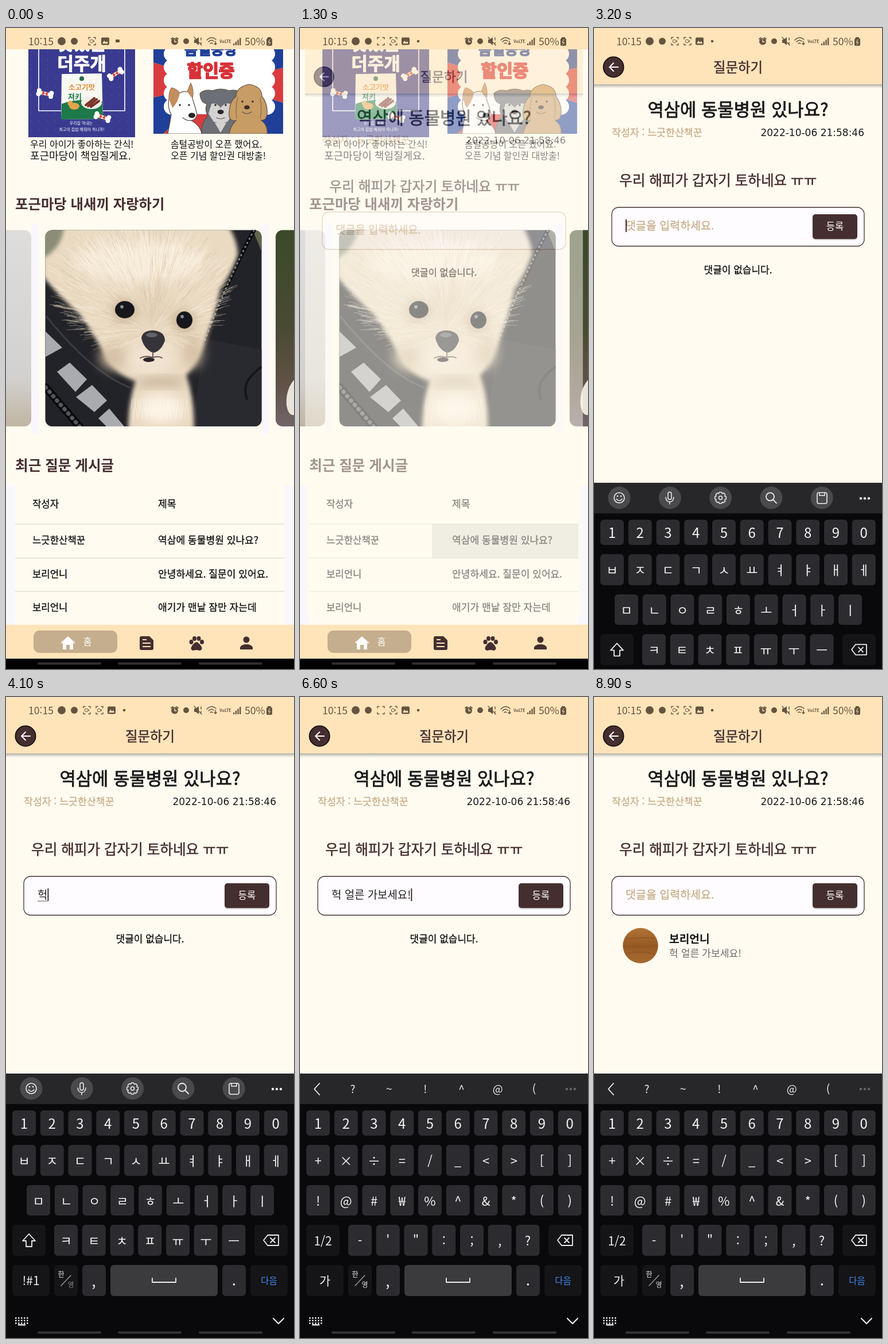
Recreate the animation shown at these times as an HTML page. Size 502x1115 px, loop 9 s.

```html
<!DOCTYPE html>
<html lang="ko">
<head>
<meta charset="utf-8">
<title>반려동물 질문 게시판</title>
<style>
html, body { margin: 0; width: 100%; height: 100%; overflow: hidden; background: #fffbf0; }
svg { display: block; width: 502px; height: 1115px; }
text { font-family: "Noto Sans CJK KR", "Noto Sans", sans-serif; white-space: pre; }
</style>
</head>
<body>
<svg viewBox="0 0 502 1115">
  <defs>
    <linearGradient id="wall" x2="0" y2="1"><stop stop-color="#dedddc"/><stop offset=".75" stop-color="#d3d1cf"/><stop offset="1" stop-color="#c0b5a3"/></linearGradient>
    <linearGradient id="heath" x2="0" y2="1"><stop stop-color="#3b4a2a"/><stop offset=".5" stop-color="#4a4a33"/><stop offset=".8" stop-color="#625348"/><stop offset="1" stop-color="#72636a"/></linearGradient>
    <linearGradient id="wood" x2="0" y2="1"><stop stop-color="#b07434"/><stop offset=".5" stop-color="#955a25"/><stop offset="1" stop-color="#a76a30"/></linearGradient>
    <linearGradient id="shade" x2="0" y2="1"><stop stop-color="#000" stop-opacity=".3"/><stop offset="1" stop-color="#000" stop-opacity="0"/></linearGradient>
    <filter id="soft"><feGaussianBlur stdDeviation="3.5"/></filter>
    <filter id="blur" x="-1" y="-1" width="3" height="3"><feGaussianBlur stdDeviation="10"/></filter>
    <clipPath id="photo"><rect x="68.5" y="351.5" width="377" height="341.5" rx="12"/></clipPath>
    <clipPath id="bannerA"><rect x="39" y="37" width="186" height="153"/></clipPath>
    <clipPath id="bannerB"><rect x="257" y="37" width="226" height="147"/></clipPath>
    <clipPath id="cell"><rect x="230" y="863" width="255" height="59"/></clipPath>
  </defs>
  <g id="home"></g>
  <g id="ripple" clip-path="url(#cell)"></g>
  <g id="page"></g>
  <g id="nav"></g>
  <g id="board"></g>
  <g id="status"></g>
</svg>
<script>
const $ = id => document.getElementById(id);
const BROWN = '#452e2f', TAN = '#c8ad89', PEACH = '#ffe4ba', CREAM = '#fffbf0', ICON = '#65543f';
const SHOP = '포근마당', SALON = '솜털공방', ASKER = '느긋한산책꾼', REPLIER = '보리언니';
const QUESTION = '역삼에 동물병원 있나요?';

// Shape helpers; text is placed by its vertical centre.
const esc = s => s.replace(/&/g, '&amp;').replace(/</g, '&lt;');
const T = (s, x, y, size, fill = '#111', anchor = 'start', weight = 400, more = '') =>
  `<text x="${x}" y="${y + size * .37}" font-size="${size}" fill="${fill}" text-anchor="${anchor}" font-weight="${weight}" ${more}>${esc(s)}</text>`;
const M = (s, x, y, size, fill, weight, more) => T(s, x, y, size, fill, 'middle', weight, more);
const thick = (color, w = .5) => `stroke="${color}" stroke-width="${w}" stroke-linejoin="round"`;
const R = (x, y, w, h, fill, r = 0, more = '') =>
  `<rect x="${x}" y="${y}" width="${w}" height="${h}" rx="${r}" fill="${fill}" ${more}/>`;
const E = (x, y, rx, ry, fill, more = '') =>
  `<ellipse cx="${x}" cy="${y}" rx="${rx}" ry="${ry}" fill="${fill}" ${more}/>`;
const C = (x, y, r, fill, more) => E(x, y, r, r, fill, more);
const F = (d, fill, more = '') => `<path d="${d}" fill="${fill}" ${more}/>`;
const L = (d, stroke, w = 1.5, more = '') =>
  `<path d="${d}" fill="none" stroke="${stroke}" stroke-width="${w}" stroke-linecap="round" stroke-linejoin="round" ${more}/>`;
const list = (n, f) => Array.from({length: n}, (_, i) => f(i)).join('');
const clamp = v => Math.max(0, Math.min(1, v));
const ease = v => 1 - (1 - clamp(v)) ** 3;
let seed = 7;
const rand = () => (seed = seed * 16807 % 2147483647) / 2147483647;

function snackBanner() {
  const bone = (x, y, a) => `<g transform="translate(${x} ${y}) rotate(${a})">` +
    L('M-9 0H9', '#fff', 6) + [-11, 11].map(v => C(v, -3, 4, '#fff') + C(v, 3, 4, '#fff')).join('') +
    F('M-5 -5L5 5V-5L-5 5z', '#d9503f') + '</g>';
  const dots = list(140, i => C(44 + i % 14 * 14, 42 + Math.floor(i / 14) * 15, 1, '#4c4ea4'));
  return '<g clip-path="url(#bannerA)">' + R(39, 37, 186, 153, '#3a3b90') + dots +
    L('M57 30V144H207V30', '#fff', 1.6) + R(84, 30, 94, 48, '#3a3b90') +
    M('맛있는', 132, 27, 31, '#fff', 700, thick('#fff', 1)) + M('더주개', 132, 62, 31, '#fff', 700, thick('#fff', 1)) +
    F('M97 80L167 79L169 158L96 159z', '#f8f8f3') +
    F('M97 132Q124 121 168 128L169 158L96 159z', '#1d7949') + C(132, 88, 4, '#246b47') +
    M('소고기맛', 132, 103, 12.5, '#e28a2c', 700) + T('져키', 108, 119, 13, '#1d7949', 'start', 700) +
    E(119, 136, 9, 6, '#e3a34b') + C(112, 131, 4.5, '#e3a34b') +
    E(149, 130, 18, 11, '#f3eee5') + L('M139 134L154 122M143 136L158 124M148 137L162 127', '#793128', 4) +
    bone(191, 80, -32) + bone(68, 114, 12) + bone(168, 155, 18) +
    M('우리집 막내는', 131, 165, 7, '#fff') + M('최고의 집밥 해줘야 하니까!', 132, 176, 7, '#fff') + '</g>';
}

function salonBanner() {
  const ray = i => {
    const p = a => `${370 + 200 * Math.cos(a)} ${95 + 200 * Math.sin(a)}`, a = i * Math.PI / 6 + .3;
    return F(`M370 95L${p(a)}L${p(a + Math.PI / 6)}z`, i % 2 ? '#d83b40' : '#203f98');
  };
  const ink = 'stroke="#5e5148" stroke-width="1.2"';
  const eyes = (x, y, gap) => C(x - gap, y, 1.7, '#2c2727') + C(x + gap, y, 1.7, '#2c2727');
  return '<g clip-path="url(#bannerB)">' + list(12, ray) + R(286, 20, 172, 130, '#fff', 20) +
    list(10, i => C(i % 2 ? 455 : 289, 45 + Math.floor(i / 2) * 23, 14, '#fff')) +
    M(SALON, 357, 37, 25, '#203f98', 900, thick('#203f98', 1.5)) + M('할인중', 357, 74, 30, '#d8323a', 900, thick('#d8323a', 2)) +
    // Terrier
    F('M282 184Q286 164 288 151Q281 138 284 123Q284 108 289 104Q297 106 303 113Q309 109 316 111L322 96Q328 108 325 123Q330 137 333 150Q331 160 323 161Q339 170 341 184z', '#fff', ink) +
    F('M284 123Q284 108 289 104Q297 106 303 113Q300 130 290 139zM316 111L322 96Q328 108 325 123z', '#c58d5e') +
    eyes(311, 134, 8) + E(324, 152, 6, 4.5, '#2c2727') + L('M308 156Q316 163 326 160', '#5e5148', 1.2) +
    // Schnauzer
    F('M341 184Q340 164 352 153Q346 143 350 132Q339 130 338 114Q346 106 360 109Q374 103 389 109Q402 106 408 113Q410 128 398 133Q402 146 396 153Q409 165 405 184z', '#6d6f76', ink) +
    F('M358 132Q367 129 374 139Q381 129 391 132L396 149L386 163Q374 168 362 163L353 149z', '#d4d2d1') +
    F('M364 165H384L374 182z', '#d4d2d1') + eyes(374, 134, 9) + E(374, 146, 5.5, 4, '#2c2727') + L('M367 156Q374 160 381 156', '#5e5148', 1.2) +
    // Poodle
    F('M389 184Q391 170 401 161Q387 163 389 145Q390 127 401 119Q401 103 423 98Q446 101 446 119Q456 130 455 149Q454 162 444 160Q457 169 455 184z', '#c79c65', ink) +
    L('M404 121Q399 142 402 157M443 121Q447 142 443 157', '#8f6c48', 1.2) +
    eyes(421, 128, 9) + E(420, 138, 5, 3.5, '#3a2b25') + L('M412 146Q420 152 428 146', '#5e5148', 1.2) + '</g>';
}

function dogPhoto() {
  const hair = color => L(list(450, () => {
    const a = rand() * 6.283, u = Math.sqrt(rand());
    const x = 236 + 144 * u * Math.cos(a), y = 454 + 104 * u * Math.sin(a);
    const dx = x - 255, dy = y - 525, k = (8 + rand() * 24) / (Math.hypot(dx, dy) + 1);
    return `M${x.toFixed()} ${y.toFixed()}q${(dx * k / 2).toFixed(1)} ${(dy * k / 2 - 2).toFixed(1)} ${(dx * k).toFixed(1)} ${(dy * k).toFixed(1)}`;
  }), color, 1, 'opacity=".4"');
  const glow = (x, y, rx, ry, fill) => E(x, y, rx, ry, fill, 'filter="url(#blur)"');
  return '<g clip-path="url(#photo)">' + R(68, 351, 378, 343, '#222328') +
    F('M68 351H125L68 410z', '#8b8d76') + F('M430 351H446V390z', '#62664f') +
    F('M345 540L446 560V694H325z', '#292a30') + L('M69 500Q150 600 215 625', '#3b3c43', 3) +
    L('M445 590Q408 615 420 645', '#15161a', 4) +
    L('M432 352Q390 430 346 545', '#090a0d', 7) + L('M432 352Q390 430 346 545', '#777980', 3, 'stroke-dasharray="1 7"') +
    L('M69 625L128 693', '#0b0b0e', 14) + L('M69 625L128 693', '#55575e', 7, 'stroke-dasharray="1 9"') +
    F('M69 528L98 556L69 572zM89 598L111 582L141 611L121 633zM122 642L150 621L176 648L154 668zM161 679L180 662L206 693H175z', '#a9abaf') +
    F('M64 400Q84 392 96 368L104 340H385Q404 370 404 394Q392 430 374 452Q364 500 351 535Q336 584 314 604Q330 650 327 700H213Q213 650 226 614Q188 602 174 572Q152 530 128 498Q96 470 64 432z', '#eadac2', 'filter="url(#soft)"') +
    glow(235, 405, 115, 38, '#f7ecdb') + glow(190, 572, 26, 22, '#d5c1a5') + glow(325, 562, 16, 30, '#d5c1a5') +
    glow(258, 480, 25, 35, '#e2cfb5') + hair('#d3bc9b') + hair('#fffaf0') + hair('#f1e0c7') +
    glow(207, 492, 20, 18, '#bda587') + glow(309, 510, 18, 17, '#bda587') + glow(252, 575, 42, 28, '#f0e3d1') +
    glow(270, 616, 46, 5, '#ad977b') + glow(270, 662, 38, 24, '#fbf3e6') +
    L(list(40, i => `M${220 + i * 2.5} ${645 + i * 17 % 34}l${i % 5 - 2} 18`), '#fffaf0', 1, 'opacity=".6"') +
    E(207, 490, 17, 15, '#17171b') + E(311, 508, 14, 15, '#17171b') + C(202, 485, 3, '#858990') + C(307, 502, 3, '#858990') +
    F('M236 539Q238 526 257 526Q277 528 277 544Q270 563 256 565Q240 558 236 539z', '#35343a') + E(254, 534, 10, 4, '#65646b') +
    L('M256 564V571M234 574Q243 569 256 573Q267 570 272 574', '#6b5a50', 2) + E(249, 577, 10, 4, '#2b2527') + '</g>';
}

function homeScene() {
  const rows = [['작성자', '제목'], [ASKER, QUESTION], [REPLIER, '안녕하세요. 질문이 있어요.'], [REPLIER, '애기가 맨날 잠만 자는데']];
  const ink = thick('#111', .3);
  return R(0, 0, 502, 1115, CREAM) + snackBanner() + salonBanner() +
    T('우리 아이가 좋아하는 간식!', 42, 202, 16) + T(SHOP + '이 책임질게요.', 42, 222, 18) +
    T(SALON + '이 오픈 했어요.', 287, 202, 15.9) + T('오픈 기념 할인권 대방출!', 287, 222, 16) +
    T(SHOP + ' 내새끼 자랑하기', 16, 306, 24.4, BROWN, 'start', 700) +
    R(44, 340, 13, 366, '#f9f7fb') + R(446, 340, 13, 366, '#f9f7fb') +
    R(-30, 351.5, 74, 341.5, 'url(#wall)', 12) + R(470, 351.5, 60, 341.5, 'url(#heath)', 12) +
    F('M502 612Q487 630 489 656Q492 675 502 673z', '#e9e3da') + dogPhoto() +
    T('최근 질문 게시글', 16, 761, 24.6, BROWN, 'start', 700) +
    R(0, 796, 16, 242, '#f9f7fc') + R(485, 796, 17, 242, '#f9f7fc') +
    [863, 922, 980].map(y => R(16, y - .6, 469, 1.2, '#dcd7cd')).join('') +
    rows.map(([a, b], i) => {
      const y = [828, 891, 950, 1008][i];
      return T(a, 46, y, 16.7, '#111', 'start', 400, ink) + T(b, 265, y, 17.1, '#111', 'start', 400, ink);
    }).join('');
}

function pageScene() {
  const dark = '#1b1a1b';
  return R(0, 37, 502, 1001, CREAM) + R(0, 98, 502, 7, 'url(#shade)') + R(0, 0, 502, 98, PEACH) +
    C(34, 68, 17.7, BROWN, 'stroke="#0c0808" stroke-width="1.6"') + L('M42 68H27M34 61L27 68L34 75', '#fff', 2) +
    M('질문하기', 251, 68, 23.4, BROWN, 500, thick(BROWN)) + M(QUESTION, 251, 142, 30.8, dark, 500, thick(dark, .8)) +
    T('작성자 : ' + ASKER, 31, 182, 17.3, TAN, 'start', 400, thick(TAN, .3)) +
    T('2022-10-06 21:58:46', 471, 182, 17, dark, 'end', 400, 'style="font-family:\'DejaVu Sans\',sans-serif"') +
    T('우리 해피가 갑자기 토하네요 ㅠㅠ', 44, 265, 24.6, BROWN, 'start', 500, thick(BROWN)) +
    R(31, 312, 440, 67.5, '#fffcff', 12, 'id="field" stroke-width="1.3"') +
    '<g id="send">' + R(381, 326, 78, 43, '#0003', 5) + R(381, 324, 78, 43, BROWN, 5) + M('등록', 420, 345, 16.5, '#fff', 500) + '</g>' +
    T('댓글을 입력하세요.', 55, 344, 19.5, TAN, 'start', 400, 'id="hint" ' + thick(TAN, .3)) + T('', 55, 344, 18.9, '#222', 'start', 400, 'id="typed"') +
    R(55, 354.5, 0, 1.2, '#777', 0, 'id="underline"') + R(55, 333, 2, 22, BROWN, 0, 'id="caret"') +
    '<g id="empty">' + M('댓글이 없습니다.', 251, 421, 17, '#111', 400, thick('#111', .3)) + '</g>' +
    '<g id="comment">' + C(81, 432.5, 30.7, 'url(#wood)') +
    L('M55 421Q80 417 106 420M51 433Q80 438 110 432M55 446Q80 441 106 447', '#8a5122', 1.2) +
    T(REPLIER, 131, 421, 19.2, '#161415', 'start', 700) + T('헉 얼른 가보세요!', 131, 446, 17.2, '#706c69') + '</g>';
}

const pills = color => [55, 195, 336].map(x => R(x, 1103.5, 111, 4, color, 2)).join('');

function navScene() {
  return R(0, 1038, 502, 59, PEACH) + R(48, 1048, 146, 39, '#c5ae8e', 10) +
    F('M108 1058L121 1070H117V1081H111V1073H105V1081H99V1070H95z', '#fff') + M('홈', 142, 1067, 16, '#fff') +
    F('M236 1058H250L257 1065V1079Q257 1082 254 1082H236Q233 1082 233 1079V1061Q233 1058 236 1058z', BROWN) +
    L('M238 1064H245M238 1070H252M238 1076H252', PEACH, 2, 'style="stroke-linecap:butt"') +
    E(323, 1068, 3.5, 4, BROWN) + E(328.5, 1062, 3.5, 4, BROWN) + E(336, 1062, 3.5, 4, BROWN) + E(341.5, 1068, 3.5, 4, BROWN) +
    F('M332 1068Q336 1069 340 1075Q344 1081 338 1083Q332 1081 326 1083Q320 1081 324 1075Q328 1069 332 1068z', BROWN) +
    C(419, 1064, 5.5, BROWN) + F('M408 1081V1077Q411 1072 419 1072Q427 1072 430 1077V1081z', BROWN) +
    R(0, 1097, 502, 18, '#000') + pills('#303030');
}

function statusScene(t) {
  const bracket = (x, cam) => L(`M${x - 6} 19V16.5H${x - 3}M${x + 3} 16.5H${x + 6}V19M${x - 6} 27V29.5H${x - 3}M${x + 3} 29.5H${x + 6}V27`, ICON, 1.4) +
    (cam ? R(x - 3.5, 20.5, 5, 5, 'none', 1, `stroke="${ICON}"`) + F(`M${x + 2} 23L${x + 4} 21V25z`, ICON) : '');
  const picture = x => R(x - 7, 16.5, 14, 13, ICON, 2) + F(`M${x - 5} 27L${x - 2} 22L${x + 1} 25L${x + 3} 23L${x + 5} 27z`, PEACH);
  const left = t < 300 ? bracket(150, true) + picture(173) + R(191, 20, 7, 5, ICON, 1)
    : bracket(141, t % 600 >= 200) + bracket(163, true) + picture(184) + C(206, 23, 2.3, ICON);
  return R(0, 0, 502, 37, PEACH) + T('10:15', 39, 23, 17.6, ICON) + C(97, 23, 7, ICON) + C(119, 23, 6, ICON) + left +
    C(294, 23.5, 6, ICON) + L('M288 19L291 17M300 19L297 17', ICON, 2) + L('M294 20V24H297', PEACH, 1.3) + C(314, 23, 5, ICON) +
    F('M328 20H331L336 16V30L331 26H328z', ICON) + L('M328 16L341 30M340 17V21M340 25V27', ICON, 1.4) +
    L('M350 21Q358 13 366 20M353 24Q358 19 362 23M356 27Q358 25 360 27M365 23V29M363 27L365 29L367 27', ICON, 1.5) +
    M('VoLTE', 382.5, 23, 7, ICON, 700) +
    list(4, i => R(396 + i * 3.7, 27 - i * 3.3, 2.3, 3 + i * 3.3, ICON)) + T('50%', 416, 23, 17.6, ICON) +
    R(454, 18, 10, 13, ICON, 2) + R(456, 16, 6, 3, ICON) + L('M460 20L457 25H461L458 29', PEACH, 1);
}

const KEY = '#2c2b2f', DARK = '#151417', PITCH = 48.75;
const LETTERS = [['1234567890', 11, 719, 44], ['ㅂㅈㄷㄱㅅㅛㅕㅑㅐㅔ', 11, 779, 54], ['ㅁㄴㅇㄹㅎㅗㅓㅏㅣ', 36, 849, 53], ['ㅋㅌㅊㅍㅠㅜㅡ', 84, 918, 54]];
const SYMBOLS = [LETTERS[0], ['+×÷=/_<>[]', 11, 779, 54], ['!@#₩%^&*()', 11, 849, 53], ['-\'":;,?', 84, 918, 54]];

function toolbar(mode) {
  const back = L('M34 672L25 682L34 692', '#eee', 1.8);
  const dots = fill => list(3, i => C(465 + i * 7, 682, 2.2, fill));
  if (mode == 'symbols') return back + [...'?~!^@('].map((s, i) => M(s, 92 + i * 63.2, 682, 19, '#eee')).join('') + dots('#666');
  if (mode == 'words') return back + ['얼른', '얼마나', '얼마'].map((s, i) => M(s, 124 + i * 127, 682, 19, '#eee')).join('');
  const w = '#eee';
  return list(5, i => C(44 + i * 88.3, 681, 19.5, '#4a4a4c')) + dots(w) +
    C(44, 681, 9, 'none', `stroke="${w}" stroke-width="1.6"`) + C(41, 678, 1.3, w) + C(47, 678, 1.3, w) + L('M39 683Q44 689 49 683', w) +
    R(129, 671, 6, 13, 'none', 3, `stroke="${w}" stroke-width="1.5"`) + L('M125 680Q126 688 132 688Q138 688 139 680M132 688V692', w) +
    F(list(8, i => { const a = i * Math.PI / 4, p = (r, d) => `${220.5 + r * Math.cos(a + d)} ${681 + r * Math.sin(a + d)}`; return `${i ? 'L' : 'M'}${p(10, -.2)}L${p(10, .2)}L${p(8, .4)}`; }) + 'z', 'none', `stroke="${w}" stroke-width="1.5"`) + C(220.5, 681, 3, 'none', `stroke="${w}" stroke-width="1.5"`) +
    C(307, 679, 7, 'none', `stroke="${w}" stroke-width="1.8"`) + L('M312 684L318 690', w, 1.8) +
    R(389, 672, 17, 19, 'none', 3, `stroke="${w}" stroke-width="1.6"`) + L('M393 672V677H402V672', w);
}

function boardScene(symbols, words, pressed) {
  let pop = '';
  const keys = (symbols ? SYMBOLS : LETTERS).map(([chars, x0, y, h]) => [...chars].map((s, i) => {
    const x = x0 + i * PITCH, mid = x + 20.5, hit = s == pressed;
    if (hit) {
      const px = Math.max(11, Math.min(416, mid - 37.5));
      pop = R(px, y - 107, 75, 97, '#242326', 12) + M(s, px + 37.5, y - 58, 37, '#fff');
    }
    return R(x, y, 41, h, hit ? '#464648' : KEY, 6) + M(s, mid, y + h / 2 + 1, y == 719 ? 24 : 22, '#f5f5f5');
  }).join('')).join('');
  const wide = (x, y, w, fill) => R(x, y, w, 54, fill, 6);
  return R(0, 655, 502, 460, '#09080b') + R(0, 655, 502, 53, '#272629') + toolbar(symbols ? 'symbols' : words ? 'words' : '') + keys +
    wide(11, 918, 58, DARK) + (symbols ? M('1/2', 40, 946, 21, '#eee') : L('M40 934L51 946H45V956H35V946H29z', '#eee', 1.8)) +
    wide(433, 918, 58, DARK) + L('M449 945L456 936H475V954H456zM461 941L469 949M469 941L461 949', '#eee', 1.8) +
    wide(11, 988, 65, pressed == '!#1' ? '#464648' : DARK) + M(symbols ? '가' : '!#1', 43.5, 1015, 21, '#eee') +
    wide(84, 988, 41, DARK) + M('한', 96, 1005, 12, '#eee') + L('M96 1024L113 1006', '#aaa', 1.2) + M('영', 113, 1023, 12, symbols ? '#ddd' : '#888') +
    wide(133, 988, 41, KEY) + M(',', 153, 1016, 26, '#eee') + wide(377, 988, 41, KEY) + M('.', 397.5, 1014, 26, '#eee') +
    wide(182, 988, 187, pressed == ' ' ? '#555' : '#3b3b3d') + L('M255 1011V1018H296V1011', '#eee', 1.8) +
    wide(426, 988, 65, DARK) + M('다음', 458.5, 1015, 15.5, '#3f8cf7') +
    list(15, i => R(16 + i % 5 * 5, 1079 + Math.floor(i / 5) * 4.5, 2.5, 2.5, '#eee')) + R(21, 1091, 13, 2.3, '#eee') +
    L('M466 1081L475 1090L484 1081', '#eee', 2.2) + pills('#353437') + pop;
}

// Each key lands 100 ms before its text: [time, key, committed, composing].
const strokes = [];
const typeWord = (start, before, keys, forms) =>
  forms.split(',').forEach((form, i) => strokes.push([start + i * 100, keys[i], before, form]));
typeWord(3900, '', 'ㅎㅓㄱ', 'ㅎ,허,헉');
strokes.push([4300, ' ', '헉 ', '']);
typeWord(4400, '헉 ', 'ㅇㅓㄹㄹㅡㄴ', 'ㅇ,어,얼,얼ㄹ,얼르,얼른');
strokes.push([5000, ' ', '헉 얼른 ', '']);
typeWord(5100, '헉 얼른 ', 'ㄱㅏㅂㅗㅅㅔㅇㅛ', 'ㄱ,가,갑,가보,가봇,가보세,가보셍,가보세요');
strokes.push([6100, '!#1', '헉 얼른 가보세요', ''], [6400, '!', '헉 얼른 가보세요!', ''], [7000, '', '', '']);

$('home').innerHTML = homeScene();
$('page').innerHTML = pageScene();
$('nav').innerHTML = navScene();
const show = (id, on) => $(id).setAttribute('display', on ? 'inline' : 'none');
const set = (id, name, value) => $(id).setAttribute(name, value);

function draw(t) {
  $('status').innerHTML = statusScene(t);

  const touch = t >= 1000 && t < 1600;
  show('ripple', touch);
  if (touch) $('ripple').innerHTML = R(230, 863, 255, 59, '#1c1b1f', 0, 'opacity=".1"') +
    C(378, 891, 83 + (t - 1100) * .43, '#1c1b1f', `opacity="${.05 * clamp((1500 - t) / 400)}"`);

  const open = ease((t - 1200) / 300), scale = .88 + .12 * open;
  show('page', t > 1200);
  set('page', 'opacity', clamp((t - 1200) / 200));
  set('page', 'transform', `translate(251 540) scale(${scale}) translate(-251 -540)`);

  const focus = t >= 3000;
  set('field', 'stroke', focus ? BROWN : TAN);
  show('send', focus);
  const [, , done, live] = strokes.filter(s => s[0] <= t).pop() || [0, '', '', ''];
  const text = done + live, typed = $('typed');
  if (typed.textContent != text) typed.textContent = text;
  show('hint', !text);
  const end = text ? typed.getComputedTextLength() : 0;
  const from = live && done ? typed.getSubStringLength(0, done.length) : 0;
  set('underline', 'x', 55 + from);
  set('underline', 'width', live ? end - from : 0);
  set('caret', 'x', 55 + end);
  const typing = t >= 3900 && t < 7000;
  show('caret', focus && (typing || Math.floor((t - 3000) / 500) % 2 == 0));
  show('empty', t < 7200);
  show('comment', t >= 7200);

  show('board', t >= 3100);
  if (t < 3100) return;
  const next = strokes.find(s => s[0] > t && s[0] - 100 <= t);
  const state = [t >= 6100, t >= 4500, next ? next[1] : ''];
  if (state.join('|') != draw.state) {
    draw.state = state.join('|');
    $('board').innerHTML = boardScene(...state);
  }
  set('board', 'transform', `translate(0 ${460 * (1 - ease((t - 3100) / 300))})`);
}

let last = -1;
function tick() {
  const t = Math.floor(performance.now() % 9000 / 100) * 100;
  if (t != last) draw(last = t);
  requestAnimationFrame(tick);
}
tick();
</script>
</body>
</html>
```
